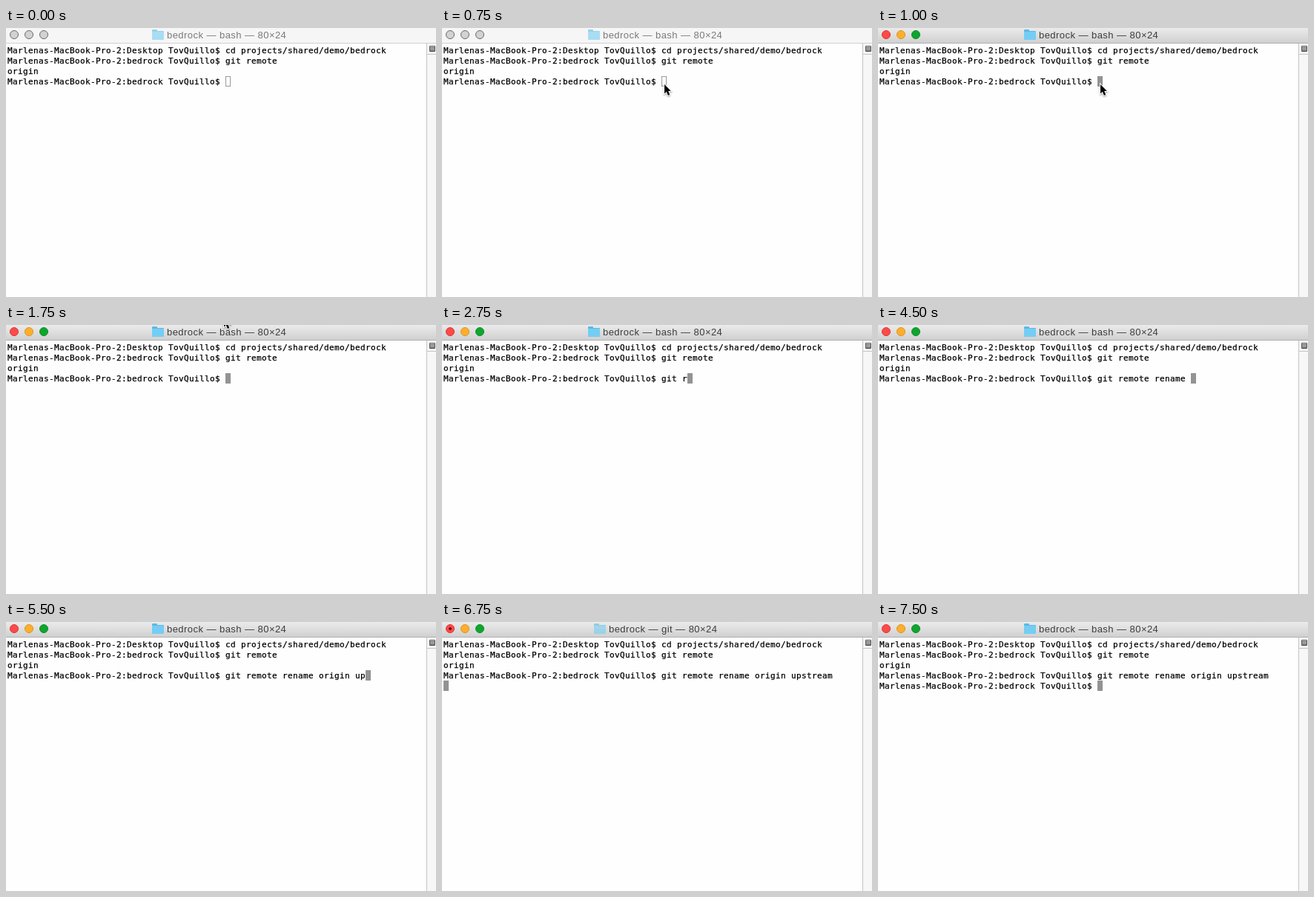
An HTML page with a canvas for the animation above (8 s loop, 580 by 363 pixels).

```html
<!DOCTYPE html>
<html lang="en">
<head>
<meta charset="utf-8">
<title>Terminal</title>
<style>
  html, body { margin: 0; height: 100%; overflow: hidden; background: #fefefe; }
  canvas { display: block; }
</style>
</head>
<body>
<canvas id="stage" width="580" height="363"></canvas>
<script>
const ctx = document.getElementById('stage').getContext('2d');
const LOOP = 8000, TICK = 250;
const CELL = 7, LINE = 14, LEFT = 2, TOP = 23;
const prompt = dir => `Marlenas-MacBook-Pro-2:${dir} TovQuillo$ `;

// Each phrase is typed evenly between its two times.
const PHRASES = [
  { text: 'git r', from: 1750, to: 2750 },
  { text: 'emote ', from: 2750, to: 3500 },
  { text: 'rename origin', from: 3750, to: 5000 },
  { text: ' upstream', from: 5000, to: 6250 },
];

const progress = (t, from, to) => Math.min(1, Math.max(0, (t - from) / (to - from)));
const mix = (a, b, k) => a + (b - a) * k;

const typed = t => PHRASES.map(({ text, from, to }) =>
  text.slice(0, Math.floor(text.length * progress(t, from, to)))).join('');

function rect(x, y, w, h, fill) {
  ctx.fillStyle = fill;
  ctx.fillRect(x, y, w, h);
}

function roundRect(x, y, w, h, radii, fill) {
  ctx.fillStyle = fill;
  ctx.beginPath();
  ctx.roundRect(x, y, w, h, radii);
  ctx.fill();
}

function gradient(y0, y1, from, to) {
  const g = ctx.createLinearGradient(0, y0, 0, y1);
  g.addColorStop(0, from);
  g.addColorStop(1, to);
  return g;
}

function disc(x, y, r, fill, edge = fill) {
  ctx.beginPath();
  ctx.arc(x, y, r, 0, 2 * Math.PI);
  ctx.fillStyle = fill;
  ctx.strokeStyle = edge;
  ctx.lineWidth = 1;
  ctx.fill();
  ctx.stroke();
}

function folder(x, opacity) {
  ctx.globalAlpha = opacity;
  roundRect(x, 2, 7, 2, [1, 1, 0, 0], '#5cb9e4');
  roundRect(x, 4, 16, 1, [0, 1, 0, 0], '#5cb9e4');
  roundRect(x, 5, 16, 11, [0, 0, 1, 1], '#74cdf4');
  ctx.globalAlpha = 1;
}

function titleBar(active, job, busy) {
  rect(0, 0, 580, 20, active ? gradient(0, 20, '#ebebeb', '#d0d0d0') : '#f6f6f6');
  rect(0, 20, 580, 1, active ? '#b0b0b0' : '#d0d0d0');
  const lights = active
    ? [['#fc4b48', '#dd3533'], ['#fdaf2c', '#dd9320'], ['#0fa52f', '#0a9026']]
    : Array(3).fill(['#d2d2d2', '#6b6b6b']);
  lights.forEach(([fill, edge], i) => disc(11 + 20 * i, 9, 5.5, fill, edge));
  if (busy) disc(11, 9, 1.5, '#700c08');

  const x = job === 'git' ? 205 : 197;
  folder(x, active && !busy ? 1 : 0.6);
  ctx.font = '13px "Liberation Sans", sans-serif';
  ctx.letterSpacing = '0.45px';
  ctx.fillStyle = active ? '#3c3c3c' : '#7a7a7a';
  ctx.fillText(`bedrock — ${job} — 80×24`, x + 20, 14);
  ctx.letterSpacing = '0px';
}

function scrollBar() {
  rect(567, 21, 13, 342, '#f7f7f7');
  rect(567, 21, 1, 342, '#c4c4c4');
  rect(568, 35, 12, 1, '#c4c4c4');
  roundRect(571, 24, 8, 8, 1, '#555');
  for (let y = 25; y < 31; y += 2) rect(572, y, 6, 1, '#d8d8d8');
}

function terminal(lines, active) {
  const row = lines.length - 1;
  const x = LEFT + CELL * lines[row].length, y = TOP + LINE * row;
  ctx.lineWidth = 1;
  ctx.strokeStyle = '#999';
  if (active) rect(x, y, CELL, LINE, '#939393');
  else ctx.strokeRect(x + 0.5, y + 0.5, CELL - 1, LINE - 1);

  // A hairline outline gives the glyphs their slightly heavier weight.
  ctx.font = '11px "DejaVu Sans Mono", monospace';
  ctx.fillStyle = ctx.strokeStyle = '#000';
  ctx.lineWidth = 0.25;
  lines.forEach((line, r) => [...line].forEach((char, c) => {
    const place = [char, LEFT + CELL * c, TOP + LINE * r + 11];
    ctx.fillText(...place);
    ctx.strokeText(...place);
  }));
}

function pointer(x, y) {
  const arrow = new Path2D('M0 0V12.5L2.8 10L4.9 14.9L7.3 13.9L5.2 9H8.8Z');
  ctx.save();
  ctx.translate(x, y);
  ctx.shadowColor = '#0006';
  ctx.shadowBlur = 2;
  ctx.shadowOffsetY = 1;
  ctx.strokeStyle = '#fff';
  ctx.lineWidth = 2;
  ctx.stroke(arrow);
  ctx.shadowColor = 'transparent';
  ctx.fillStyle = '#000';
  ctx.fill(arrow);
  ctx.restore();
}

// Glides in to the prompt, rests there, then leaves over the top edge.
function drawPointer(t) {
  if (t < 250 || t >= 2000) return;
  if (t >= 1750) return pointer(294, -10);
  const k = 1 - (1 - progress(t, 250, 750)) ** 2;
  pointer(mix(360, 300, k), mix(110, 76, k));
}

function draw(now) {
  const t = Math.floor(now % LOOP / TICK) * TICK;
  const active = t >= 1000, entered = t >= 6750, done = t >= 7250;
  const lines = [
    prompt('Desktop') + 'cd projects/shared/demo/bedrock',
    prompt('bedrock') + 'git remote',
    'origin',
    prompt('bedrock') + typed(t),
  ];
  if (entered) lines.push(done ? prompt('bedrock') : '');

  rect(0, 0, 580, 363, '#fefefe');
  titleBar(active, entered && !done ? 'git' : 'bash', entered && t < 7500);
  scrollBar();
  terminal(lines, active);
  drawPointer(t);
}

const start = performance.now();
function tick() {
  draw(performance.now() - start);
  requestAnimationFrame(tick);
}
tick();
</script>
</body>
</html>
```
